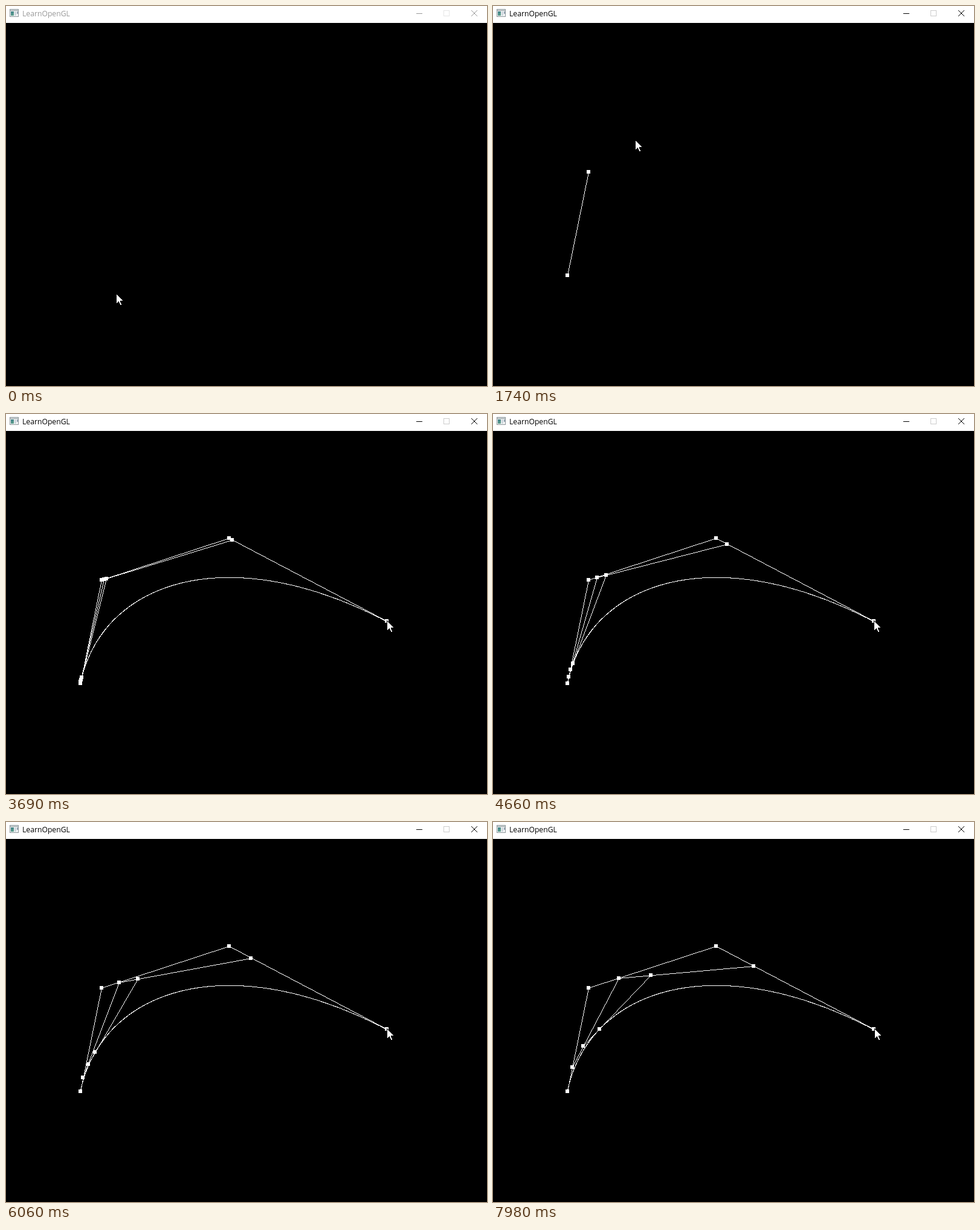
Recreate the animation shown at these times as an HTML page with a canvas. Size 796 px wide and 628 px high, loop 8 s.

```html
<!DOCTYPE html>
<html lang="en">
<head>
<meta charset="utf-8">
<title>LearnOpenGL</title>
<style>
  html, body { margin: 0; width: 100%; height: 100%; overflow: hidden; background: #000; }
  canvas { display: block; width: 796px; height: 628px; }
</style>
</head>
<body>
<canvas id="stage" width="796" height="628"></canvas>
<script>
const ctx = document.getElementById('stage').getContext('2d');
const LOOP = 8000;
const RATE = 0.0508 / 1000; // curve parameter per ms

// Control points and the time each one is clicked in
const clicks = [
  { at: 700, p: [123, 445] },
  { at: 1500, p: [158, 274] },
  { at: 2340, p: [369, 205] },
  { at: 3300, p: [630, 342] }
];

// Mouse path: time, x, y
const mousePath = [
  [0, 182, 475], [140, 182, 475], [560, 123, 444], [740, 123, 444],
  [1000, 144, 340], [1050, 144, 340], [1340, 158, 273], [1530, 158, 273],
  [1790, 253, 209], [2040, 318, 192], [2270, 369, 204], [2400, 369, 204],
  [2490, 373, 204], [2530, 375, 205], [2620, 509, 268], [2860, 604, 326],
  [3100, 630, 341], [7800, 630, 341], [7801, 631, 341], [LOOP, 631, 341]
];

// Pointer bitmap rows: outline x, fill dot
const pointer = [
  'x', 'xx', 'x.x', 'x..x', 'x...x', 'x....x', 'x.....x', 'x......x',
  'x.......x', 'x........x', 'x.........x', 'x..........x', 'x......xxxxx',
  'x...x..x', 'x..xx..x', 'x.x  x..x', 'xx   x..x', 'x     x..x',
  '      x..x', '       xx'
];

const mix = (a, b, t) => a + (b - a) * t;
const mixPoint = (a, b, t) => [mix(a[0], b[0], t), mix(a[1], b[1], t)];

// Whole-pixel coordinates, truncated in a y-up space
const snap = ([x, y]) => [Math.floor(x), Math.ceil(y)];

function box(x, y, w, h, color) {
  ctx.fillStyle = color;
  ctx.fillRect(x, y, w, h);
}

function frameBox(x, y, w, h, color) {
  ctx.strokeStyle = color;
  ctx.lineWidth = 1;
  ctx.strokeRect(x + 0.5, y + 0.5, w - 1, h - 1);
}

// Hard-edged line between pixel centres
function line(a, b) {
  const steps = Math.max(Math.abs(b[0] - a[0]), Math.abs(b[1] - a[1]));
  for (let i = 0; i < steps; i++) {
    const [x, y] = mixPoint(a, b, i / steps);
    ctx.fillRect(Math.round(x), Math.round(y), 1, 1);
  }
}

function polyline(points) {
  for (let i = 1; i < points.length; i++) line(points[i - 1], points[i]);
}

function marker([x, y]) {
  ctx.fillRect(x - 3, y - 3, 6, 6);
}

// All de Casteljau levels, from the control polygon down to one point
function levels(points, t) {
  const result = [points];
  while (points.length > 1) {
    points = points.slice(1).map((p, i) => mixPoint(points[i], p, t));
    result.push(points);
  }
  return result;
}

function drawCurve(points) {
  const steps = 1000;
  for (let i = 0; i <= steps; i++) {
    const [x, y] = snap(levels(points, i / steps).pop()[0]);
    ctx.fillRect(x, y, 1, 1);
  }
}

function drawScene(time) {
  const placed = clicks.filter(c => time >= c.at);
  if (!placed.length) return;
  const points = placed.map(c => c.p);
  const t = points.length > 2 ? (time - placed[placed.length - 1].at) * RATE : 0;
  ctx.fillStyle = '#fff';
  for (const level of levels(points, t)) {
    const pixels = level.map(snap);
    polyline(pixels);
    pixels.forEach(marker);
  }
  if (points.length > 2) drawCurve(points);
}

function drawIcon() {
  box(6, 5, 15, 13, '#8c9699');
  box(7, 6, 13, 1, '#e3e9ec');
  box(7, 8, 13, 9, '#f4f6f7');
  const teal = ctx.createLinearGradient(8, 9, 13, 16);
  teal.addColorStop(0, '#367c87');
  teal.addColorStop(1, '#67a58d');
  box(8, 9, 5, 7, teal);
  box(14, 9, 3, 7, '#cfd7dd');
  box(18, 9, 2, 4, '#96a6b4');
}

function drawTitleBar(active) {
  const ink = active ? '#000' : '#999';
  box(0, 0, 796, 28, '#fff');
  drawIcon();
  ctx.fillStyle = ink;
  ctx.font = '12.2px "Open Sans", "Noto Sans", sans-serif';
  ctx.fillText('LearnOpenGL', 27, 17);
  box(679, 12, 10, 1, ink);
  frameBox(724, 7, 10, 10, active ? '#ccc' : '#e6e6e6');
  ctx.strokeStyle = ink;
  ctx.beginPath();
  ctx.moveTo(770, 7);
  ctx.lineTo(780, 17);
  ctx.moveTo(780, 7);
  ctx.lineTo(770, 17);
  ctx.stroke();
}

function mouseAt(time) {
  const i = mousePath.findIndex(k => k[0] > time);
  const [t0, ...from] = mousePath[i - 1];
  const [t1, ...to] = mousePath[i];
  return mixPoint(from, to, (time - t0) / (t1 - t0)).map(Math.round);
}

function drawPointer([x, y]) {
  pointer.forEach((row, j) => [...row].forEach((c, i) => {
    if (c !== ' ') box(x + i, y + j, 1, 1, c === 'x' ? '#000' : '#fff');
  }));
}

function draw(time) {
  box(0, 0, 796, 628, '#000');
  drawScene(time);
  drawTitleBar(time >= clicks[0].at);
  drawPointer(mouseAt(time));
}

const start = performance.now();
function tick() {
  draw((performance.now() - start) % LOOP);
  requestAnimationFrame(tick);
}
tick();
</script>
</body>
</html>
```
